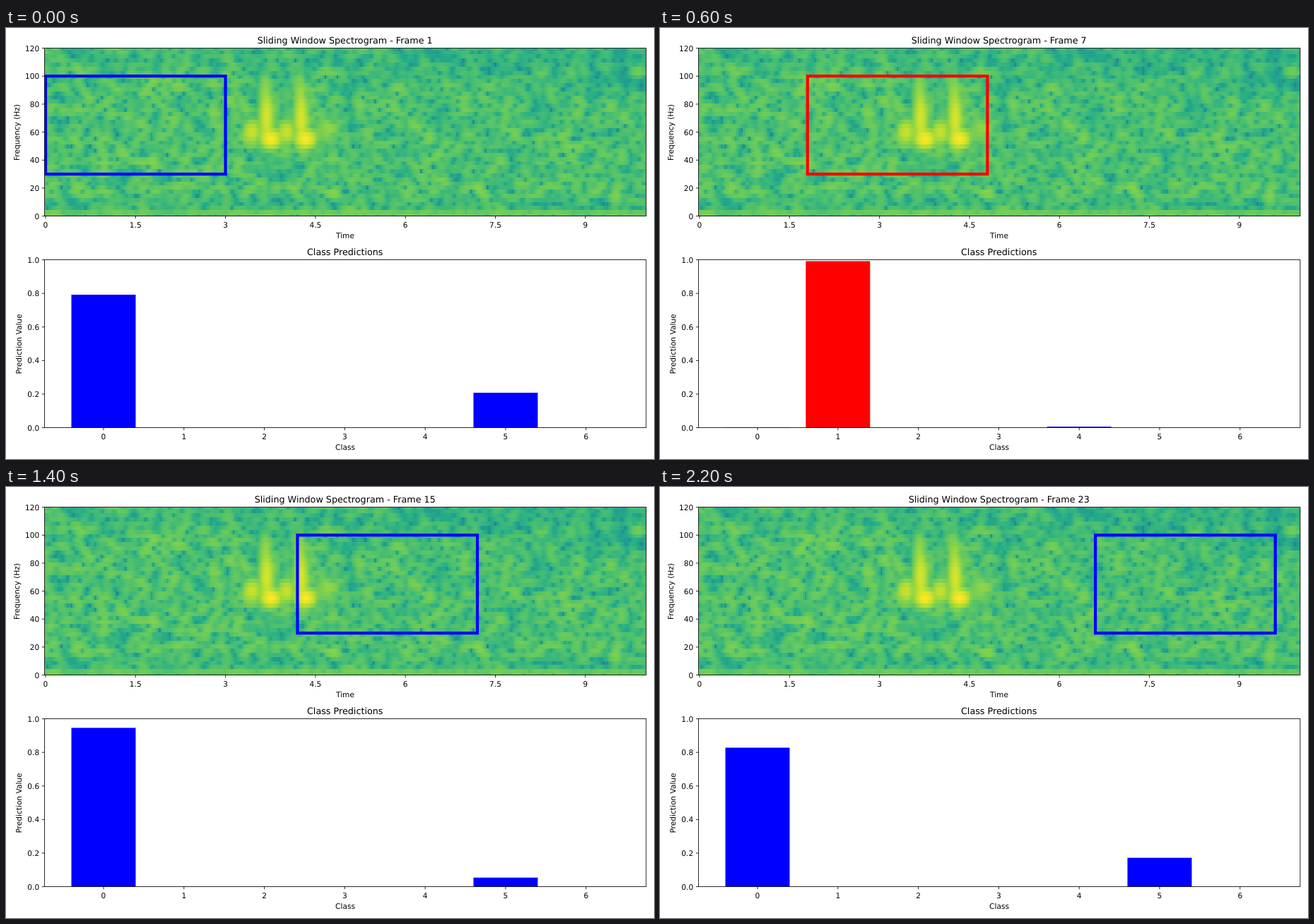
Animation of 917x611 px, one loop 2.3 s. Source, as an HTML page with a canvas:

```html
<!DOCTYPE html>
<html lang="en">
<head>
<meta charset="utf-8">
<title>Sliding Window Spectrogram</title>
<style>
  html, body { margin: 0; width: 100%; height: 100%; overflow: hidden; background: #fff; }
  canvas, svg { position: absolute; left: 0; top: 0; }
  canvas { left: 55px; top: 29px; }
  text { font: 10.61px "DejaVu Sans", sans-serif; text-anchor: middle; fill: #000; text-rendering: geometricPrecision; }
  .title { font-size: 12.74px; }
  .end { text-anchor: end; }
  .axis { fill: none; stroke: #000; stroke-width: .85; }
  #win { fill: none; stroke-width: 4.24; }
</style>
</head>
<body>
<canvas id="spec" width="851" height="238"></canvas>
<svg id="stage" width="917" height="611" viewBox="0 0 917 611">
  <clipPath id="clip"><rect x="54.6" y="28.6" width="851.3" height="238"/></clipPath>
  <g clip-path="url(#clip)"><rect id="win" y="68.2" width="254.6" height="138.9"/></g>
  <g id="bars"></g>
  <g id="axes"></g>
  <text id="head" class="title" x="479.7" y="22.1"></text>
  <text class="title" x="479.7" y="322.1">Class Predictions</text>
  <text x="480" y="297.6">Time</text>
  <text x="480" y="597.6">Class</text>
  <text transform="translate(19 148) rotate(-90)">Frequency (Hz)</text>
  <text transform="translate(22.2 448) rotate(-90)">Prediction Value</text>
</svg>
<script>
const STEP = 100, STEPS = 23;
const LEFT = 54.6, RIGHT = 905.9, HEIGHT = 238;
const X0 = 56, PX_PER_SEC = 84.87, PX_PER_HZ = HEIGHT / 120;
const SPEC_BOTTOM = 266.6, BAR_BOTTOM = 566.6;
const CLASSES = 7, BAR_X = 138, BAR_GAP = 113.8, BAR_W = 91;

const byId = id => document.getElementById(id);
const clamp = v => Math.min(1, Math.max(0, v));
const bump = (v, mid, spread) => Math.exp(-(((v - mid) / spread) ** 2));
const rise = (v, mid, spread) => 1 / (1 + Math.exp((mid - v) / spread));
const tent = (v, mid, half) => clamp(1 - Math.abs(v - mid) / half);

function add(parent, tag, attrs, text) {
  const el = document.createElementNS('http://www.w3.org/2000/svg', tag);
  for (const k in attrs) el.setAttribute(k, attrs[k]);
  if (text !== undefined) el.textContent = text;
  return parent.appendChild(el);
}

// --- axes ---
const axes = byId('axes');

function frameBox(bottom) {
  add(axes, 'rect', { class: 'axis', x: LEFT, y: bottom - HEIGHT, width: RIGHT - LEFT, height: HEIGHT });
}
function xTick(x, bottom, label) {
  add(axes, 'path', { class: 'axis', d: `M${x} ${bottom}v3.7` });
  add(axes, 'text', { x, y: bottom + 16 }, label);
}
function yTick(y, label) {
  add(axes, 'path', { class: 'axis', d: `M${LEFT} ${y}h-3.7` });
  add(axes, 'text', { class: 'end', x: 47.2, y: y + 3.9 }, label);
}

frameBox(SPEC_BOTTOM);
frameBox(BAR_BOTTOM);
for (let i = 0; i < 7; i++) {
  xTick(X0 + i * 1.5 * PX_PER_SEC, SPEC_BOTTOM, i * 1.5);
  xTick(BAR_X + i * BAR_GAP, BAR_BOTTOM, i);
  yTick(SPEC_BOTTOM - i * 20 * PX_PER_HZ, i * 20);
}
for (let i = 0; i < 6; i++) yTick(BAR_BOTTOM - i * HEIGHT / 5, (i / 5).toFixed(1));

// --- spectrogram: short-time Fourier transform of seeded noise ---
const RATE = 750, SIZE = 256, HOP = 25, COLS = 302, ROWS = 42;
const CELL_W = HOP / RATE * PX_PER_SEC, CELL_H = RATE / SIZE * PX_PER_HZ;

// Upper part of the viridis colour map
function viridis(v) {
  const t = clamp((v - .55) / .45);
  return [
    35 + 218 * clamp((v - .6) / .4) ** 1.3,
    231 - 118 * (clamp(1 - v) / .625) ** 1.4,
    142 - 105 * t * t * (3 - 2 * t)
  ];
}

let seed = 71;
function random() {
  seed = seed + 0x6D2B79F5 | 0;
  let r = Math.imul(seed ^ seed >>> 15, 1 | seed);
  r = r + Math.imul(r ^ r >>> 7, 61 | r) ^ r;
  return ((r ^ r >>> 14) >>> 0) / 4294967296;
}

const power = db => 10 ** (db / 10);

// Two like syllables: a soft onset, a tall stem that fades upwards, a bright foot
function callPower(x, y) {
  const blob = (mx, my, sx, sy, db) => power(db) * bump(x, mx, sx) * bump(y, my, sy);
  let sum = blob(452, 144, 12, 14, 5);
  for (const cx of [375, 424]) {
    sum += blob(cx - 27, 147, 7.5, 10, 15)
      + blob(cx - 6, 128, 6, 22, 17)
      + blob(cx - 8, 92, 6, 20, 7)
      + blob(cx, 157, 8.5, 8, 21);
  }
  return sum;
}

function background(sec, hz) {
  return -3 * bump(hz, 9, 5) - 3 * bump(hz, 113, 13) - 1.5 * rise(sec, 4.8, .4) * rise(hz, 60, 8);
}

function spectrum() {
  const signal = Array.from({ length: HOP * COLS + SIZE },
    () => random() + random() + random() + random() - 2);
  const cos = Array.from({ length: SIZE }, (_, n) => Math.cos(2 * Math.PI * n / SIZE));
  const hann = cos.map(c => (1 - c) / 2);
  const meanPower = SIZE / 8;
  const cells = [];
  for (let c = 0; c < COLS; c++) {
    const part = hann.map((h, n) => h * signal[c * HOP + n]);
    for (let r = 0; r < ROWS; r++) {
      let re = 0, im = 0;
      for (let n = 0; n < SIZE; n++) {
        const k = r * n % SIZE;
        re += part[n] * cos[k];
        im += part[n] * cos[(k + SIZE * 3 / 4) % SIZE];
      }
      const noise = 10 * Math.log10((re * re + im * im) / meanPower + .001);
      const db = r < 2 ? 3 + noise * .25 : noise * .75 + background(c * HOP / RATE, r * RATE / SIZE);
      const total = power(db) + callPower(X0 + c * CELL_W, SPEC_BOTTOM - r * CELL_H);
      cells[r * COLS + c] = viridis(.735 + Math.log10(total) / 8);
    }
  }
  return cells;
}

function paintSpectrum() {
  const canvas = byId('spec'), ctx = canvas.getContext('2d');
  const { width, height } = canvas;
  const image = ctx.createImageData(width, height), cells = spectrum();
  for (let y = 0; y < height; y++) {
    const r = Math.min(ROWS - 1, Math.max(0, Math.round((height - y - .5) / CELL_H)));
    for (let x = 0; x < width; x++) {
      const c = Math.min(COLS - 1, Math.max(0, Math.round((x - .5) / CELL_W)));
      image.data.set([...cells[r * COLS + c], 255], (y * width + x) * 4);
    }
  }
  ctx.putImageData(image, 0, 0);
}
paintSpectrum();

// --- motion ---
// The call enters the window near step 4 and leaves near step 12; class 0 takes the rest.
function predictions(step) {
  const entering = tent(step, 4, 2), leaving = tent(step, 12, 2);
  const call = .992 * clamp(Math.min((step - 3.14) / 2.86, (12.04 - step) / 2.04));
  const values = [
    0,
    call,
    0,
    .128 * entering + .862 * leaving,
    .134 * entering + .006 * call + .01 * leaving,
    Math.max(0, .208 - .042 * step, Math.min(.172, .018 * (step - 11))) * (1 - call),
    .003 * entering
  ];
  values[0] = Math.max(0, 1 - values.reduce((a, b) => a + b));
  return values;
}

const win = byId('win'), head = byId('head');
const bars = Array.from({ length: CLASSES }, (_, i) => add(byId('bars'), 'rect', {
  x: BAR_X + i * BAR_GAP - BAR_W / 2, width: BAR_W, fill: i === 1 ? '#f00' : '#00f'
}));

let shown = -1;
function show(step) {
  if (step === shown) return;
  shown = step;
  const values = predictions(step);
  const hit = values[1] === Math.max(...values);
  win.setAttribute('x', X0 + step * .3 * PX_PER_SEC);
  win.setAttribute('stroke', hit ? '#f00' : '#00f');
  head.textContent = `Sliding Window Spectrogram - Frame ${step + 1}`;
  bars.forEach((bar, i) => {
    bar.setAttribute('y', BAR_BOTTOM - values[i] * HEIGHT);
    bar.setAttribute('height', values[i] * HEIGHT);
  });
}

function tick() {
  show(Math.floor(performance.now() / STEP) % STEPS);
  requestAnimationFrame(tick);
}
show(0);
requestAnimationFrame(tick);
</script>
</body>
</html>
```
